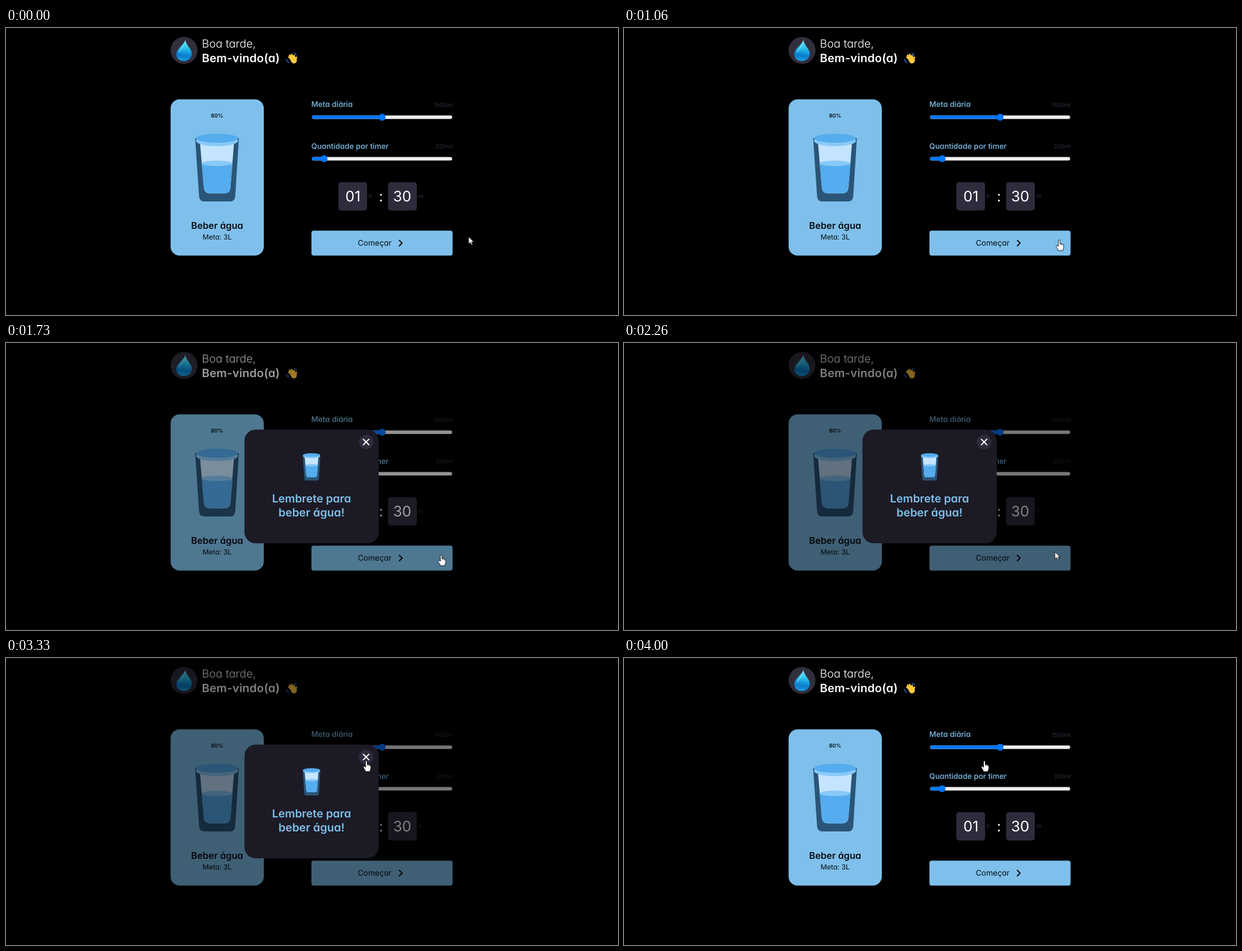
Animation of 1092 by 513 pixels, one loop 4330 ms. Source, as an HTML page:

```html
<!DOCTYPE html>
<html lang="pt-BR">
<head>
<meta charset="utf-8">
<title>Lembrete para beber água</title>
<style>
  html, body { margin: 0; width: 100%; height: 100%; overflow: hidden; background: #000; }
  svg { display: block; width: 100%; height: 100%; }
  text {
    font-family: Inter, "Open Sans", sans-serif;
    font-feature-settings: "cv11";
    text-rendering: geometricPrecision;
  }
  .mid { text-anchor: middle; }
  .end { text-anchor: end; }
  .white { fill: #fff; }
  .sky { fill: #7ec0eb; }
  .ink { fill: #080c12; }
  .box { fill: #2f2b3c; }
  .label { font-size: 13.5px; font-weight: 500; }
  .note { font-size: 10px; fill: #322f42; }
  .time { font-size: 26px; }
  .semi { font-weight: 600; }
  .track { fill: #efefef; stroke: #b8b8b8; stroke-width: .5; }
  .fill { fill: #0075ff; }
  .line { fill: none; stroke-width: 2; stroke-linecap: round; stroke-linejoin: round; }

  .shade, .modal, .cursor, .arrow, .hand { animation: 4330ms linear infinite; }
  .shade { animation-name: shade; opacity: 0; }
  .modal { animation-name: modal; opacity: 0; }
  .cursor { animation-name: move; }
  .arrow { animation-name: arrow; animation-timing-function: step-end; }
  .hand { animation-name: hand; animation-timing-function: step-end; }

  @keyframes shade {
    0% { opacity: 0; }
    35.33% { opacity: 0; animation-timing-function: ease; }
    45.27% { opacity: .5; }
    86.14% { opacity: .5; animation-timing-function: ease-in-out; }
    92.38%, 100% { opacity: 0; }
  }
  @keyframes modal {
    0%, 34.99% { opacity: 0; }
    36.95% { opacity: .8; }
    39.26%, 85.8% { opacity: 1; }
    87.76% { opacity: .36; }
    90.07%, 100% { opacity: 0; }
  }
  @keyframes move {
    0%, 1.4% { transform: translate(825.5px, 373px); }
    9.24% { transform: translate(826.5px, 373px); }
    17% { transform: translate(826.5px, 373px); animation-timing-function: ease-in-out; }
    24.48% { transform: translate(776.5px, 379px); }
    47.5% { transform: translate(776.5px, 379px); animation-timing-function: ease-in; }
    58.43% { transform: translate(745px, 355px); }
    64.67% { transform: translate(651px, 229px); animation-timing-function: ease-out; }
    70.67% { transform: translate(644px, 189px); animation-timing-function: ease-out; }
    76.9%, 100% { transform: translate(643px, 184px); }
  }
  @keyframes arrow {
    0% { opacity: 1; }
    21.5% { opacity: 0; }
    47.58% { opacity: 1; }
    70.6%, 100% { opacity: 0; }
  }
  @keyframes hand {
    0% { opacity: 0; }
    21.5% { opacity: 1; }
    47.58% { opacity: 0; }
    70.6%, 100% { opacity: 1; }
  }
</style>
</head>
<body>
<svg viewBox="0 0 1092 513">
  <defs>
    <linearGradient id="water" x1=".55" y1="0" x2=".45" y2="1">
      <stop offset="0" stop-color="#8be6fa"/>
      <stop offset=".4" stop-color="#25bfec"/>
      <stop offset=".75" stop-color="#0a7bcb"/>
      <stop offset="1" stop-color="#179fe2"/>
    </linearGradient>
    <g id="glass">
      <path fill="#2a5578" d="M337.5 197L344.5 301Q345.3 310 354 310H400Q408 310 409 301L415.5 197Z"/>
      <path fill="#c5e4ff" d="M346 203L353 285Q354 295.5 363 295.5H391Q399.5 295.5 400.5 285L407 203Z"/>
      <path fill="#55acee" d="M349.2 242L353 285Q354 295.5 363 295.5H391Q399.5 295.5 400.5 285L404 242Z"/>
      <ellipse fill="#88c9f9" cx="376.6" cy="242" rx="27.6" ry="5"/>
      <ellipse fill="#88c9f9" cx="376.5" cy="201.5" rx="37.5" ry="9.8"/>
      <ellipse fill="#55acee" cx="376.5" cy="197" rx="37.5" ry="8"/>
    </g>
  </defs>

  <!-- greeting -->
  <circle cx="317.7" cy="40" r="24" fill="#322f3d"/>
  <path fill="url(#water)" d="M320 21C318 30 304 37 304 47C304 55 310 59 317.5 59C325 59 331.5 54 331.5 46C331.5 37 321 31 320 21Z"/>
  <path fill="#b4f0fc" opacity=".45" d="M318.500 27C317 33 309 38 308 45C312 40 318 36 318.500 27Z"/>
  <text class="white" x="349.500" y="35" font-size="20" font-weight="300">Boa tarde,</text>
  <text class="white semi" x="349.500" y="61" font-size="20.500" letter-spacing=".2">Bem-vindo(a)</text>
  <g class="line">
    <path stroke="#27509c" d="M514 45.500Q517 45.800 518 48.500M500.500 56Q501 60 504.500 61.500"/>
    <path stroke="#ffc83d" stroke-width="3" d="M512 58L504.800 52M513 57L506 48.800M514 55.500L509.500 47.500M515.500 57L514 49.500M516 59L518 52.500"/>
    <path stroke="#ffc83d" fill="#ffc83d" d="M508 56L514.500 52.500L518 57Q518 62 513.500 62.500Q510.500 62 508 56Z"/>
  </g>

  <!-- daily card -->
  <rect class="sky" x="293.700" y="127.500" width="166.300" height="279.300" rx="16"/>
  <text class="ink mid semi" x="376.700" y="160.300" font-size="9.500">80%</text>
  <use href="#glass"/>
  <text class="ink mid semi" x="376.700" y="359" font-size="16.600">Beber água</text>
  <text class="ink mid" x="376.700" y="378.300" font-size="12.500">Meta: 3L</text>

  <!-- settings -->
  <text class="sky label" x="544.800" y="141.300">Meta diária</text>
  <text class="note end" x="797" y="140.500">1500ml</text>
  <rect class="track" x="546" y="156.500" width="250" height="6" rx="3"/>
  <rect class="fill" x="546" y="156.500" width="125" height="6" rx="3"/>
  <circle class="fill" cx="671" cy="159.500" r="6.200"/>

  <text class="sky label" x="544.800" y="215.500">Quantidade por timer</text>
  <text class="note end" x="797" y="214.800">200ml</text>
  <rect class="track" x="546" y="230.700" width="250" height="6" rx="3"/>
  <rect class="fill" x="546" y="230.700" width="22" height="6" rx="3"/>
  <circle class="fill" cx="567.500" cy="233.700" r="6.200"/>

  <rect class="box" x="593" y="275.400" width="51.300" height="50.800" rx="5"/>
  <rect class="box" x="681.700" y="275.400" width="51.300" height="50.800" rx="5"/>
  <text class="white mid time" x="619" y="310">01</text>
  <text class="white mid time" x="669" y="310">:</text>
  <text class="white mid time" x="707" y="310">30</text>
  <text class="note" x="647" y="304">h</text>
  <text class="note" x="735.800" y="304">m</text>

  <rect class="sky" x="545" y="362.300" width="251.800" height="44.500" rx="4"/>
  <text class="ink" x="627.700" y="388.700" font-size="13.900">Começar</text>
  <path class="line" stroke="#080c12" d="M701.800 379.500L706.800 384.500L701.800 389.500"/>

  <rect class="shade" width="1092" height="513"/>

  <!-- reminder -->
  <g class="modal">
    <rect x="425.500" y="154.800" width="239.500" height="203.200" rx="20" fill="#1c1a25"/>
    <circle class="box" cx="642.500" cy="177" r="13"/>
    <path class="line" stroke="#fff" stroke-width="1.800" d="M637.500 172L647.500 182M647.500 172L637.500 182"/>
    <use href="#glass" transform="translate(393.1 120.6) scale(.404)"/>
    <text class="sky mid semi" x="545.200" y="285" font-size="19.900">Lembrete para</text>
    <text class="sky mid semi" x="545.200" y="310.300" font-size="20">beber água!</text>
  </g>

  <g class="cursor" fill="#fff" stroke="#000" stroke-width=".9" stroke-linejoin="round">
    <path class="arrow" d="M0 0V13.200L3 10.400L5 15L7.200 14L5.300 9.600H9.200Z"/>
    <g class="hand">
      <path d="M-1.500 1.200Q-1.500 -.2 0 -.2T1.500 1.200V6.500Q3 5.800 4 7Q5.800 6.400 6.300 7.800Q8 7.600 8 9.300V13Q8 15 6.800 16.500V19H-2V16.800Q-4 14.500 -5.300 11.500Q-5.600 9.800 -4.200 9.500Q-2.800 9.700 -1.500 11.500Z"/>
      <path fill="none" stroke-width=".5" d="M1.500 6.500V9.500M4 7V9.800M6.300 7.800V10"/>
    </g>
  </g>
</svg>
</body>
</html>
```
